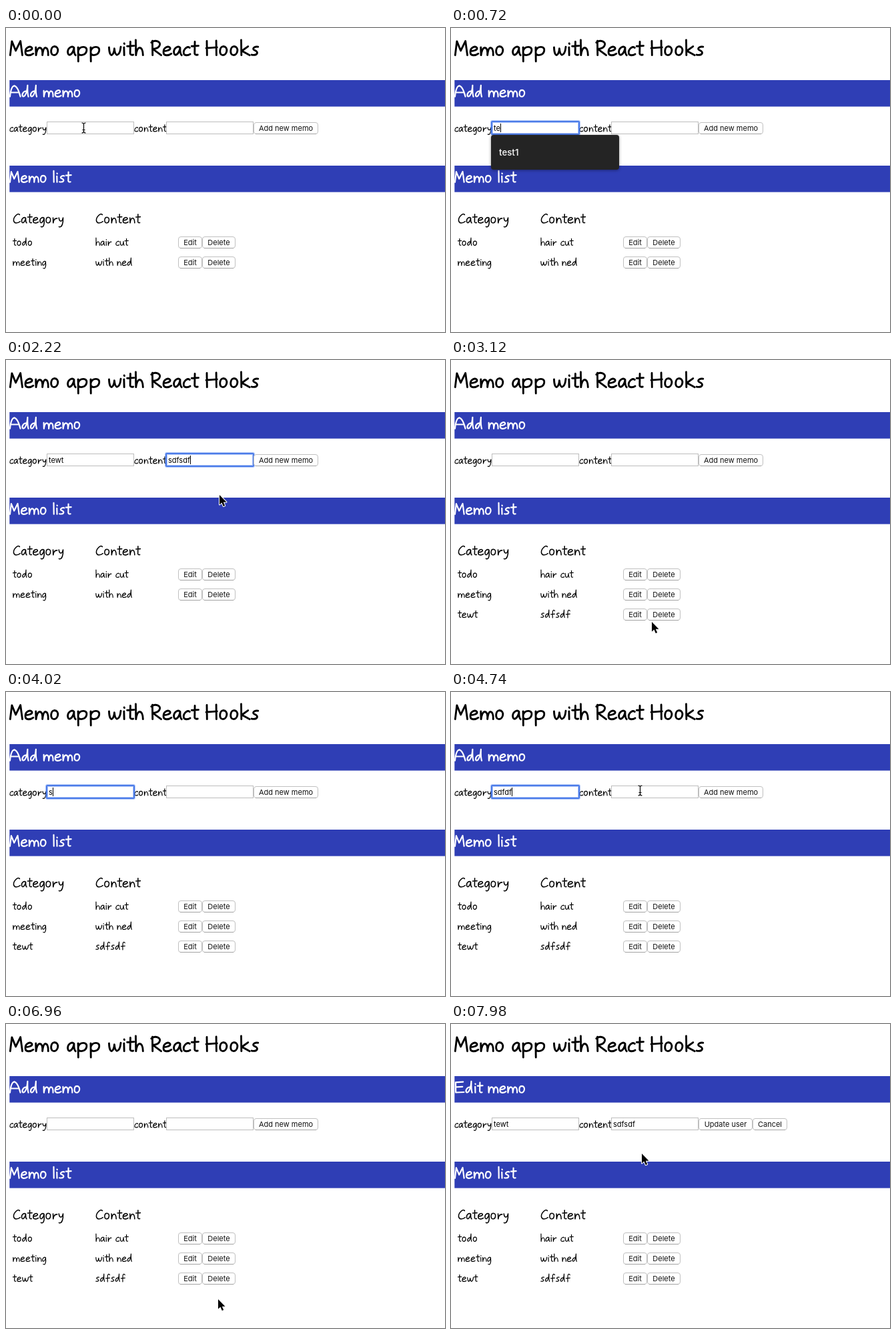
Animation of 658 by 455 pixels, one loop 8 s. Source, as an HTML page with a canvas:

```html
<!DOCTYPE html>
<html lang="en">
<head>
<meta charset="utf-8">
<title>Memo app with React Hooks</title>
<style>
  html, body { margin: 0; width: 100%; height: 100%; overflow: hidden; background: #fff; }
  canvas { display: block; width: 658px; height: 455px; }
</style>
</head>
<body>
<canvas id="stage" width="658" height="455">Memo app with React Hooks: a form to add memos and a list of memos.</canvas>
<script>
const ctx = document.getElementById('stage').getContext('2d');
const LOOP = 8000, TICK = 60;
const BLUE = '#2f3eb5';
const REGULAR = 7.5, BOLD = 9;

// Pen lettering: strokes in hundredths of an em, baseline at y = 0.
const stem = (x, top, end = -1) => `M${x} ${top}L${x + 1} ${end}`;
const hump = 'q5-35 18-35q14 1 15 35';
const loop = 'M34-36C24-47 2-34 5-12C8 7 28-4 34-34';
const ring = 'M22-42C4-42 0-1 20-1S48-41 22-42';

// Advance width, then strokes.
const pen = {
  ' ': [30, ''],
  a: [45, loop + 'Q33-8 41-1'],
  c: [40, 'M34-36C24-47 2-28 6-9C9 3 28 0 36-6'],
  d: [52, 'M36-32C18-44 1-18 6-6C12 6 34-8 38-72Q36-20 43-1'],
  e: [50, 'M7-20C22-20 41-26 37-35C30-47 6-38 6-16C6 4 30 2 43-8'],
  f: [48, 'M40-62C34-76 19-72 20-42L20 2M4-30L41-34'],
  g: [42, loop + 'C38 6 32 36 12 25'],
  h: [46, stem(6, -72) + hump],
  i: [22, stem(10, -38) + stem(11, -56, -54)],
  k: [51, stem(6, -72) + 'M38-42L9-21L46-1'],
  l: [18, stem(8, -72)],
  m: [70, stem(5, -38) + hump.replace('15 35', '12 35') + 'q4-35 14-35q14 1 13 35'],
  n: [46, stem(6, -38) + hump],
  o: [50, ring],
  p: [59, stem(8, -38, 28) + 'M8-20C16-47 53-44 48-22C44 0 18 3 9-7'],
  r: [44, stem(7, -38) + 'q4-35 29-33'],
  s: [42, 'M34-40C16-44 5-30 16-25C41-16 30 2 4-3'],
  t: [37, 'M18-64L17-9Q19 0 31-3M3-43L35-45'],
  u: [46, 'M6-38C4-8 12 0 22-2Q34-8 36-38Q36-10 42-1'],
  w: [65, 'M5-38C6-10 12 0 18-2Q28-8 30-32Q32-6 42-2C54-4 58-20 60-40'],
  y: [42, 'M5-38Q8-14 20-14Q30-16 35-38C37-4 28 35 6 26'],
  A: [76, 'M4-1Q10-64 30-69Q52-66 69-1M7-28L61-27'],
  C: [60, 'M50-60C40-78 4-44 7-18C12 8 42-1 54-12'],
  E: [68, 'M55-68L8-65L9-2L60-4M9-36L51-38'],
  H: [62, stem(7, -67) + stem(51, -69) + 'M4-34L55-38'],
  M: [69, 'M4-1L12-66L30-22L52-67L61-1'],
  R: [54, stem(8, -68) + 'M3-60C20-76 50-64 42-47C38-36 22-31 10-30L49-1']
};
const strokes = {};
for (const ch in pen) strokes[ch] = new Path2D(pen[ch][1]);

function write(text, x, y, size, weight = REGULAR, color = '#000') {
  ctx.save();
  ctx.translate(x, y);
  ctx.scale(size / 100, size / 100);
  ctx.strokeStyle = color;
  ctx.lineWidth = weight;
  ctx.lineCap = ctx.lineJoin = 'round';
  for (const ch of text) {
    ctx.stroke(strokes[ch]);
    ctx.translate(pen[ch][0], 0);
  }
  ctx.restore();
}

function type(text, x, y, color = '#000', size = 11, weight = 400, align = 'left') {
  ctx.font = `${weight} ${size}px Inter, Roboto, sans-serif`;
  ctx.fillStyle = color;
  ctx.textAlign = align;
  ctx.fillText(text, x, y);
}

function box(x, y, w, h, r) {
  ctx.beginPath();
  ctx.roundRect(x, y, w, h, r);
}

function bar(title, y) {
  ctx.fillStyle = BLUE;
  ctx.fillRect(5.3, y, 653, 39.6);
  write(title, 5, y + 25, 24, BOLD, '#fff');
}

function button(label, x, y, w, pressed) {
  box(x + 0.5, y + 0.5, w - 1, 17, 3.5);
  ctx.fillStyle = pressed ? '#3f86f5' : '#fff';
  ctx.fill();
  ctx.lineWidth = 1;
  ctx.strokeStyle = pressed ? '#2f6fdc' : '#c0c0c0';
  ctx.stroke();
  if (!pressed) {
    ctx.fillStyle = '#a3a3a3';
    ctx.fillRect(x + 3, y + 17, w - 6, 1);
  }
  type(label, x + w / 2, y + 13, pressed ? '#fff' : '#111', 11, 400, 'center');
}

function input(x, value, focused) {
  ctx.fillStyle = '#fff';
  ctx.fillRect(x, 140, 131, 19);
  ctx.lineWidth = 1;
  ctx.strokeStyle = '#bdbdbd';
  ctx.strokeRect(x + 0.5, 140.5, 130, 18);
  if (focused) {
    box(x, 140, 131, 19, 1);
    ctx.lineWidth = 4;
    ctx.strokeStyle = 'rgba(80,130,240,.45)';
    ctx.stroke();
    ctx.lineWidth = 2;
    ctx.strokeStyle = '#4c7ce8';
    ctx.stroke();
  }
  type(value, x + 3, 154);
  if (focused) ctx.fillRect(Math.round(x + 3 + ctx.measureText(value).width), 143, 1, 13);
}

function suggest(x, items) {
  ctx.save();
  ctx.shadowColor = 'rgba(0,0,0,.4)';
  ctx.shadowBlur = 4;
  ctx.shadowOffsetY = 1;
  box(x, 160, 192, 16 + 36 * items.length, 4);
  ctx.fillStyle = '#242424';
  ctx.fill();
  ctx.restore();
  items.forEach((item, i) => type(item, x + 12, 191 + 36 * i, '#eaeaea', 13, 600));
}

// Stepped values: [start time, value].
const category = [[0, ''], [540, 't'], [660, 'te'], [960, 'tew'], [1080, 'tewt'], [2460, ''],
  [3960, 's'], [4080, 'sd'], [4140, 'sdf'], [4260, 'sdfd'], [4320, 'sdfdf'], [5820, ''], [7680, 'tewt']];
const content = [[0, ''], [1560, 's'], [2160, 'sdfsdf'], [2460, ''],
  [5040, 'r'], [5100, 'rr'], [5220, 'rrr'], [5280, 'rrrr'], [5820, ''], [7680, 'sdfsdf']];
const focus = [[0, ''], [300, 'category'], [1320, 'content'], [2340, ''],
  [3900, 'category'], [4860, 'content'], [5700, '']];
const press = [[0, ''], [2340, 'add'], [2460, ''], [5700, 'add'], [5820, ''],
  [6780, 'delete3'], [6900, ''], [7560, 'edit2'], [7680, '']];
const rowCount = [[0, 2], [2460, 3], [5820, 4], [6900, 3]];
const memos = [['todo', 'hair cut'], ['meeting', 'with ned'], ['tewt', 'sdfsdf'], ['sdfdf', 'rrrr']];

// Pointer trips; it hides while keys are typed.
const trips = [
  [[0, 116, 149], [540, 116, 149]],
  [[1740, 250, 190], [2040, 285, 222], [2160, 285, 222], [2340, 420, 146], [2580, 420, 146],
    [3120, 301, 392], [3360, 304, 396], [3840, 130, 149], [3960, 130, 149]],
  [[4440, 130, 149], [4740, 283, 147], [5040, 283, 147]],
  [[5400, 283, 147], [5640, 425, 145], [5940, 425, 145], [6600, 316, 419], [6720, 318, 412],
    [6960, 318, 412], [7380, 274, 379], [7680, 274, 379], [7980, 286, 194], [8000, 286, 194]]
];

const at = (steps, t) => steps.findLast(step => step[0] <= t)[1];

function pointerAt(t) {
  const trip = trips.find(p => t >= p[0][0] && t < p[p.length - 1][0]);
  if (!trip) return null;
  const i = trip.findIndex(p => p[0] > t);
  const [t0, x0, y0] = trip[i - 1], [t1, x1, y1] = trip[i];
  const u = (t - t0) / (t1 - t0), k = u * u * (3 - 2 * u);
  return [x0 + (x1 - x0) * k, y0 + (y1 - y0) * k];
}

const arrow = new Path2D('M0 0V14.5L3.4 11.5L5.8 17L8.2 16L5.8 10.7H10.5Z');
const beam = new Path2D('M-3-7.5Q0-7.5 0-5V5Q0 7.5-3 7.5M3-7.5Q0-7.5 0-5M0 5Q0 7.5 3 7.5M-2 3H2');

function pointer([x, y]) {
  const overField = y > 140 && y < 159 && x > 61 && x < 371 && !(x > 192 && x < 240);
  ctx.save();
  ctx.translate(Math.round(x), Math.round(y));
  if (overField) {
    ctx.translate(0.5, 0.5);
    ctx.lineWidth = 1.2;
    ctx.strokeStyle = '#000';
    ctx.stroke(beam);
  } else {
    ctx.lineWidth = 2;
    ctx.lineJoin = 'round';
    ctx.strokeStyle = '#fff';
    ctx.stroke(arrow);
    ctx.fillStyle = '#000';
    ctx.fill(arrow);
  }
  ctx.restore();
}

function draw(t) {
  const editing = t >= 7680, focused = at(focus, t), pressed = at(press, t);
  ctx.fillStyle = '#fff';
  ctx.fillRect(0, 0, 658, 455);

  write('Memo app with React Hooks', 5, 41, 32, BOLD);
  bar(editing ? 'Edit memo' : 'Add memo', 78);
  bar('Memo list', 206);

  write('category', 5, 155, 16);
  write('content', 192, 155, 16);
  input(61, at(category, t), focused === 'category');
  input(240, at(content, t), focused === 'content');
  if (editing) {
    button('Update user', 371, 141, 81);
    button('Cancel', 452, 141, 52);
  } else {
    button('Add new memo', 371, 141, 97, pressed === 'add');
  }

  write('Category', 10, 292, 20.8);
  write('Content', 134, 292, 20.8);
  memos.slice(0, at(rowCount, t)).forEach(([kind, text], i) => {
    const y = 326 + 30 * i;
    write(kind, 10, y - 0.5, 16);
    write(text, 134, y - 0.5, 16);
    button('Edit', 258, y - 14, 36, pressed === 'edit' + i);
    button('Delete', 294, y - 14, 50, pressed === 'delete' + i);
  });

  if (t >= 540 && t < 960) suggest(60, ['test1']);
  if (t >= 1560 && t < 2160) suggest(240, ['sdf', 'sdfsdf', 'shirts']);

  const spot = pointerAt(t);
  if (spot) pointer(spot);
}

const start = performance.now();
function frame() {
  const t = (performance.now() - start) % LOOP;
  draw(Math.floor(t / TICK) * TICK);
  requestAnimationFrame(frame);
}
frame();
</script>
</body>
</html>
```
